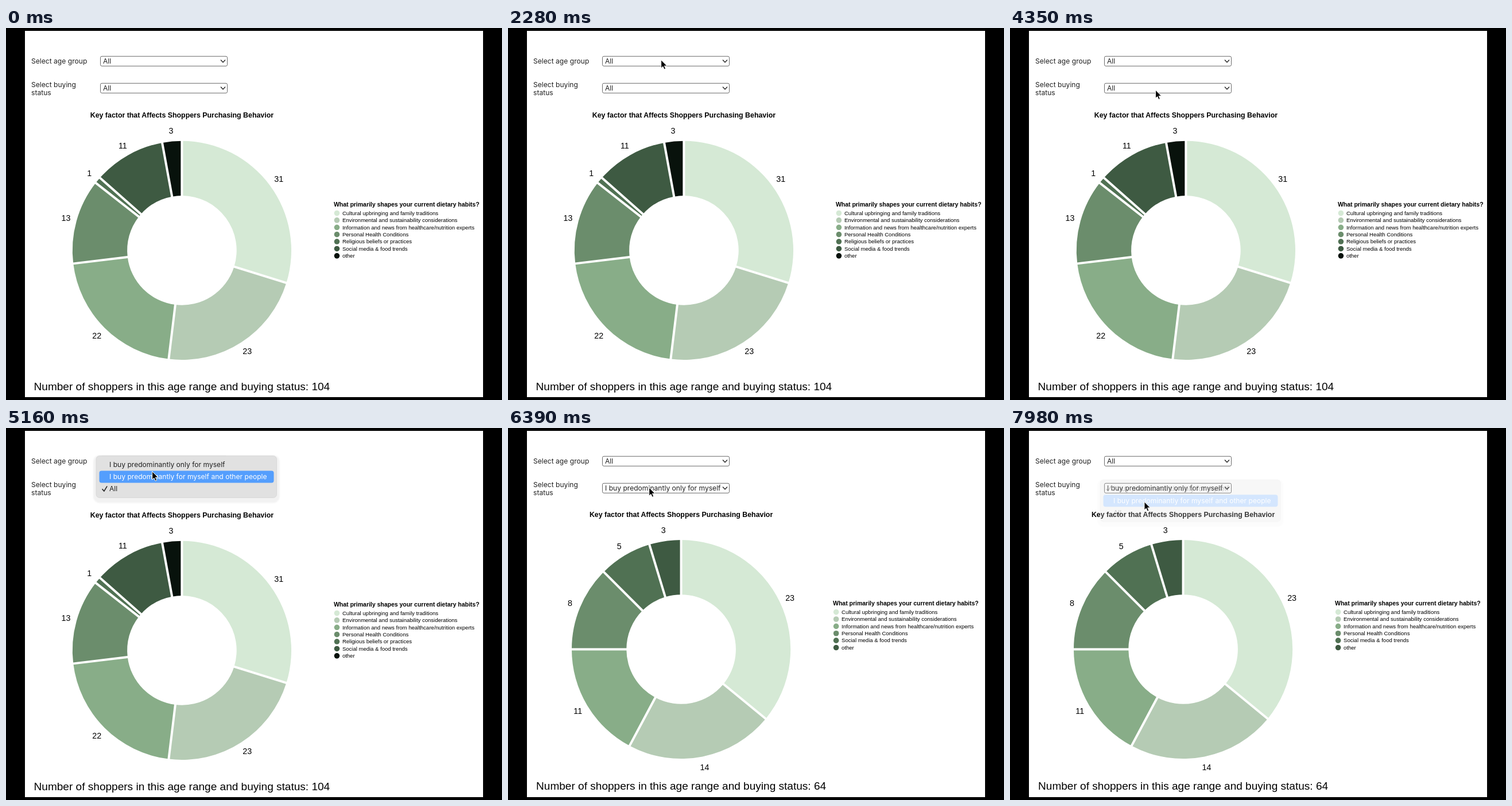
These frames come from a looping animation (864 px wide and 648 px high, 8 s). An HTML page:

```html
<!DOCTYPE html>
<html lang="en">
<head>
<meta charset="utf-8">
<title>Shopper survey</title>
<style>
  html, body { margin: 0; width: 100%; height: 100%; overflow: hidden; background: #000; }
  svg { display: block; width: 864px; height: 648px; }
  .ui { font: 12.1px Inter, Roboto, sans-serif; fill: #222; }
  .chart { font-family: "Liberation Sans", Arial, sans-serif; fill: #000; }
  .bold { font-weight: bold; }
  .mid { text-anchor: middle; }
</style>
</head>
<body>
<svg id="stage" viewBox="0 0 864 648" xmlns="http://www.w3.org/2000/svg"></svg>
<script>
const LOOP = 8000;
const FADE = 240;
const SWITCH = 6110; // the filtered chart replaces the full one
const ROW = 21;
const SCALE = 0.953;
const COLORS = ['#d5e9d5', '#b5cbb4', '#88ad88', '#6b8d6c', '#507153', '#3e5a42', '#08120c'];
const FACTORS = [
  'Cultural upbringing and family traditions',
  'Environmental and sustainability considerations',
  'Information and news from healthcare/nutrition experts',
  'Personal Health Conditions',
  'Religious beliefs or practices',
  'Social media &amp; food trends',
  'other'
];
const AGES = ['18 to 24 years old', '25 to 35 years old', 'All'];
const BUYERS = ['I buy predominantly only for myself', 'I buy predominantly for myself and other people', 'All'];

const MENUS = [
  { items: AGES, top: 1, width: 222.5, checked: 2, open: 2700, pick: 3630 },
  { items: BUYERS, top: 48.5, width: 314.5, checked: 2, open: 4410, pick: 5870 },
  { items: BUYERS, top: 90.3, width: 314.5, checked: 0, open: 6780, pick: 7800 }
];

// time, x, y of the pointer tip
const POINTER = [
  [450, 776, 612], [990, 565, 375], [1200, 565, 375], [1530, 252, 114],
  [1980, 266, 59], [2460, 267, 54], [3690, 267, 54], [3990, 253.5, 104],
  [4230, 253.5, 104], [4350, 253.5, 108], [4620, 253.5, 109], [5400, 255, 66],
  [5850, 255, 66], [5970, 252.5, 79], [6300, 246, 104], [6600, 245, 103],
  [7110, 244, 102], [7260, 244, 102], [7500, 236, 124], [7700, 234, 128.5]
];

const text = (x, y, str, cls, size) =>
  `<text x="${x}" y="${y}" class="${cls}"${size ? ` font-size="${size * SCALE}"` : ''}>${str}</text>`;

const box = (x, y, w, h, r, style) =>
  `<rect x="${x}" y="${y}" width="${w}" height="${h}" rx="${r}" ${style}/>`;

function polar(cx, cy, r, turn) {
  const a = turn * 2 * Math.PI;
  return [cx + r * Math.sin(a), cy - r * Math.cos(a)];
}

function donut(cx, cy, values) {
  const R = 200 * SCALE, r = 100 * SCALE;
  const total = values.reduce((a, b) => a + b);
  let start = 0, slices = '', gaps = '', labels = '';
  values.forEach((v, i) => {
    const end = start + v / total;
    const big = end - start > 0.5 ? 1 : 0;
    const p = (rad, turn) => polar(cx, cy, rad, turn).join(' ');
    slices += `<path fill="${COLORS[i]}" d="M${p(R, start)}A${R} ${R} 0 ${big} 1 ${p(R, end)}` +
      `L${p(r, end)}A${r} ${r} 0 ${big} 0 ${p(r, start)}Z"/>`;
    gaps += `M${p(r - 2, start)}L${p(R + 2, start)}`;
    const [lx, ly] = polar(cx, cy, 220 * SCALE, (start + end) / 2);
    labels += text(lx, ly + 5, v, 'mid', 15);
    start = end;
  });
  return slices + `<path d="${gaps}" stroke="#fff" stroke-width="4"/>` + labels;
}

function legend(x, y, names) {
  return text(x, y + 3.7, 'What primarily shapes your current dietary habits?', 'bold', 11) +
    names.map((name, i) => {
      const cy = y + 15.6 + i * 13 * SCALE;
      return `<circle cx="${x + 5.5}" cy="${cy}" r="4.8" fill="${COLORS[i]}"/>` +
        text(x + 15, cy + 3.3, name, '', 10);
    }).join('');
}

function chart(id, cx, cy, titleY, values, names) {
  const total = values.reduce((a, b) => a + b);
  return `<g id="${id}" class="chart">` +
    text(cx, titleY, 'Key factor that Affects Shoppers Purchasing Behavior', 'bold mid', 13) +
    donut(cx, cy, values) + legend(cx + 264.5, cy - 80.5, names) +
    text(cx, cy + 244, `Number of shoppers in this age range and buying status: ${total}`, 'mid', 20) +
    '</g>';
}

const select = (y, id) =>
  box(164.5, y, 221, 17, 2.5, 'fill="#fff" stroke="#6b6b6b"') +
  `<text id="${id}" x="169" y="${y + 13}" class="ui">All</text>` +
  `<path d="M374 ${y + 6.2}l4 4.2 4-4.2" fill="none" stroke="#222" stroke-width="1.3"/>`;

function menu(m, i) {
  const h = ROW * 3 + 10;
  const rows = m.items.map((s, k) => {
    const y = m.top + 5 + k * ROW;
    const tick = k === m.checked
      ? `<path d="M168 ${y + 11.2}l2.8 3.4 5-8.2" fill="none" stroke="#222" stroke-width="1.6" stroke-linecap="round" stroke-linejoin="round"/>`
      : '';
    return `<g class="row">${tick}${text(180, y + 14.9, s, 'ui')}</g>`;
  }).join('');
  return `<g id="menu${i}">` +
    box(152, m.top - 1, m.width + 10, h + 10, 11, 'fill="#000" fill-opacity=".05" filter="url(#soft)"') +
    box(157, m.top, m.width, h, 6, 'fill="#e1e1e1" stroke="#cfcfcf" stroke-width=".6"') +
    box(162.5, 0, m.width - 10.5, ROW, 4, 'class="mark" fill="#549efd"') + rows + '</g>';
}

const stage = document.getElementById('stage');
stage.innerHTML =
  '<defs><filter id="soft"><feGaussianBlur stdDeviation="1.2"/></filter>' +
  '<clipPath id="page"><rect x="33" y="5" width="798" height="638"/></clipPath></defs>' +
  '<rect width="864" height="648" fill="#000"/><g clip-path="url(#page)">' +
  box(33, 5, 798, 638, 0, 'fill="#fff"') +
  text(44, 62.4, 'Select age group', 'ui') +
  text(44, 102.6, 'Select buying', 'ui') + text(44, 117.2, 'status', 'ui') +
  select(49.3, 'age') + select(96.3, 'buyer') +
  chart('full', 306.4, 387.4, 156, [31, 23, 22, 13, 1, 11, 3], FACTORS) +
  chart('solo', 301.6, 385.5, 155.4, [23, 14, 11, 8, 5, 3], FACTORS.filter((f, i) => i !== 4)) +
  MENUS.map(menu).join('') +
  '<path id="pointer" d="M0 0V14.4L3.2 11.4 5.4 16.5 7.9 15.4 5.7 10.4H10.3Z" fill="#000" stroke="#fff" stroke-width="1" stroke-linejoin="round"/></g>';

const $ = id => document.getElementById(id);
const show = (el, on) => el.setAttribute('display', on ? 'inline' : 'none');
const clamp = (v, lo, hi) => Math.max(lo, Math.min(hi, v));

function pointerAt(t) {
  const next = POINTER.findIndex(k => k[0] > t);
  if (next === 0) return POINTER[0].slice(1);
  if (next < 0) return POINTER[POINTER.length - 1].slice(1);
  const a = POINTER[next - 1], b = POINTER[next];
  const u = (t - a[0]) / (b[0] - a[0]);
  const e = u * u * (3 - 2 * u);
  return [a[1] + (b[1] - a[1]) * e, a[2] + (b[2] - a[2]) * e];
}

function drawMenu(m, i, t) {
  const g = $('menu' + i);
  const alpha = 1 - clamp((t - m.pick) / FADE, 0, 1);
  const on = t >= m.open && alpha > 0;
  show(g, on);
  if (!on) return;
  g.setAttribute('opacity', alpha);
  // the choice stays marked while the menu fades
  const y = pointerAt(Math.min(t, m.pick - 30))[1];
  const hot = clamp(Math.floor((y - m.top - 5) / ROW), 0, 2);
  g.querySelector('.mark').setAttribute('y', m.top + 5 + hot * ROW);
  g.querySelectorAll('.row').forEach((row, k) => {
    const color = k === hot ? '#fff' : '#222';
    row.querySelector('text').style.fill = color;
    const tick = row.querySelector('path');
    if (tick) tick.style.stroke = color;
  });
}

function draw(t) {
  const solo = t >= SWITCH;
  show($('full'), !solo);
  show($('solo'), solo);
  $('buyer').textContent = solo ? BUYERS[0] : 'All';
  MENUS.forEach((m, i) => drawMenu(m, i, t));
  show($('pointer'), t >= POINTER[0][0]);
  $('pointer').setAttribute('transform', `translate(${pointerAt(t)})`);
}

const began = performance.now();
function tick() {
  draw((performance.now() - began) % LOOP);
  requestAnimationFrame(tick);
}
draw(0);
requestAnimationFrame(tick);
</script>
</body>
</html>
```
